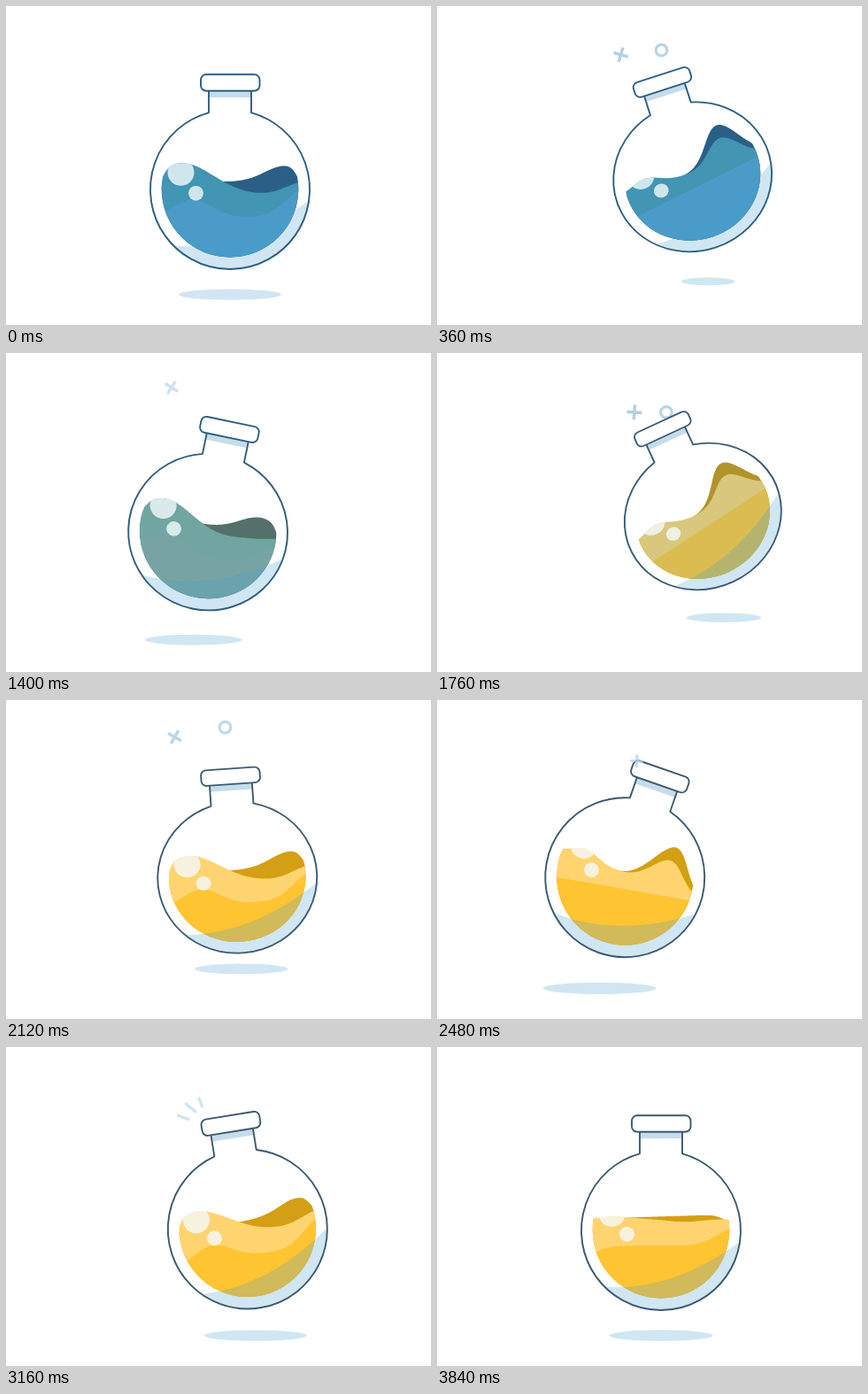
An HTML page that plays this animation: 480 px wide and 360 px high, repeating every 3.88 s.

```html
<!DOCTYPE html>
<html lang="en">
<head>
<meta charset="utf-8">
<title>Swinging flask</title>
<style>
  html, body { margin: 0; width: 100%; height: 100%; overflow: hidden; background: #fff; }
  svg { display: block; width: 480px; height: 360px; }
</style>
</head>
<body>
<svg viewBox="0 0 480 360" fill="none" stroke-linecap="round" stroke-linejoin="round">
  <defs>
    <clipPath id="glass"><circle r="90"/></clipPath>
    <clipPath id="bowl"><circle cy="-1" r="77.3"/></clipPath>
    <clipPath id="wet"><path id="wetPath"/></clipPath>
  </defs>
  <ellipse id="shadow" fill="#d0e6f3"/>
  <g id="rings" stroke="#b8d4e8" stroke-width="3.2"></g>
  <g id="flask">
    <path d="M-24-111V-87A90 90 0 1 0 24-87V-111Z" fill="#fff"/>
    <path d="M-24-112H24V-104H-24Z" fill="#c6dcea"/>
    <g clip-path="url(#bowl)">
      <path id="back"/>
      <path id="mid"/>
      <path id="front"/>
      <g clip-path="url(#wet)" fill="#f4fbfc" fill-opacity=".8">
        <circle cx="-55.5" cy="-19.5" r="15"/>
        <circle cx="-38.5" cy="4" r="8.4"/>
      </g>
    </g>
    <path clip-path="url(#glass)" fill="#439bcb" fill-opacity=".25"
      d="M-70 63C-20 68 35 54 95 8V95H-70Z"/>
    <g id="outline" stroke-width="1.9">
      <path d="M-24-111V-87A90 90 0 1 0 24-87V-111"/>
      <rect x="-33" y="-130" width="66.5" height="18.5" rx="6" fill="#fff"/>
    </g>
  </g>
  <g id="pluses" stroke="#b3d0e5" stroke-width="3.4" stroke-linecap="butt"></g>
  <path id="dashes" stroke="#cfe4f2" stroke-width="3.4" d="M194.500 77.300L206 81.500M203.500 64.500L214 73M218 58L221.500 67"/>
</svg>
<script>
const LOOP = 3880, END = 3840;
const $ = id => document.getElementById(id);
const set = (el, attrs) => { for (const k in attrs) el.setAttribute(k, attrs[k]); };
const clamp = v => Math.max(0, Math.min(1, v));
const mix = (a, b, k) => a + (b - a) * k;
const ease = k => (1 - Math.cos(Math.PI * k)) / 2;

// Turning points of the swing; everything eases from one to the next.
const turns = [0, 580, 1230, 1820, 2435, 3055, 3505, END];
const track = values => t => {
  let i = 0;
  while (i < turns.length - 2 && t >= turns[i + 1]) i++;
  const k = clamp((t - turns[i]) / (turns[i + 1] - turns[i]));
  return mix(values[i], values[i + 1], ease(k));
};
const angle = track([0, 26, -20.8, 26, -19.5, 12.4, -12.4, 0]);
const squash = track([1, .9, 1, .9, 1, 1, 1, 1]);
const shadowW = track([116, 36, 116, 84, 128, 116, 116, 117]);

// A liquid surface is a sloping line with round humps: [height, centre, width].
const surface = (level, slope, ...humps) => x =>
  humps.reduce((y, [h, c, w]) => y - h * Math.exp(-(((x - c) / w) ** 2)), level + slope * x);

const layers = {
  back: {
    calm: surface(-9, 0, [18, 62, 32], [-14, 82, 9]),
    tilted: surface(-4, 0, [47, 44, 28]),
    flat: surface(-16, -.03, [-8, 80, 14]),
    cool: [42, 96, 134], warm: [212, 159, 20]
  },
  mid: {
    calm: surface(6, 0, [36, -54, 50], [15, 85, 30], [-14, -82, 9]),
    tilted: surface(-5, 0, [11, -52, 22], [30, 43, 25]),
    flat: surface(-13, 0, [3, -52, 26], [-3, 26, 26]),
    cool: [66, 149, 179], warm: [255, 212, 112]
  },
  front: {
    calm: surface(31, 0, [20, -42, 30], [32, 85, 30]),
    tilted: surface(13, -.16),
    flat: surface(17, 0, [-10, -85, 20], [20, 85, 30]),
    cool: [75, 154, 200], warm: [254, 196, 50]
  }
};
const line = { cool: [42, 95, 130], warm: [59, 90, 112] };

const tint = ({ cool, warm }, k) =>
  `rgb(${cool.map((v, i) => Math.round(mix(v, warm[i], k)))})`;

function surfacePath({ calm, tilted, flat }, tilt, rest) {
  let d = 'M-80 90';
  for (let x = -80; x <= 80; x += 2) {
    const y = mix(mix(calm(x), tilted(x), tilt), flat(x), rest);
    d += `L${x} ${y.toFixed(2)}`;
  }
  return d + 'V90Z';
}

function add(parent, tag, attrs) {
  const el = document.createElementNS('http://www.w3.org/2000/svg', tag);
  set(el, attrs);
  return $(parent).appendChild(el);
}

// Sparkles rise from the cap, turn and fade.
const sparkles = [75, 885, 1645, 2395, 3230].map((start, i) => ({
  start,
  plus: add('pluses', 'path', { d: 'M-8.500 0H8.500M0-8.500V8.500' }),
  ring: i === 0 || i === 2 ? add('rings', 'circle', { r: 6.3 }) : null
}));

function drawSparkle({ start, plus, ring }, t) {
  const age = t - start;
  const opacity = clamp((age - 30) / 70) * clamp((610 - age) / 150);
  const x = 223 - .09 * (age - 115), y = 75 - .07 * age;
  set(plus, {
    opacity,
    transform: `translate(${x} ${y}) rotate(${.07 * (age - 50)}) scale(${clamp(.4 + age / 190)})`
  });
  if (ring) set(ring, { opacity, cx: 259 - .032 * (age - 115), cy: 78.5 - .1 * age });
}

function draw(now) {
  const t = Math.min(now % LOOP, END);
  const a = angle(t);
  const warm = clamp((t - 1240) / 650);
  const tilt = ease(clamp((Math.abs(a) - 10) / 7));
  const rest = ease(clamp((t - 3000) / (END - 3000)));

  set($('flask'), {
    transform: `translate(253 82.3) rotate(${-a}) scale(1 ${squash(t)}) translate(0 125)`
  });
  for (const name in layers) {
    set($(name), { d: surfacePath(layers[name], tilt, rest), fill: tint(layers[name], warm) });
  }
  set($('wetPath'), { d: $('mid').getAttribute('d') });
  set($('outline'), { stroke: tint(line, warm) });

  // The shadow trails the squash a little.
  const w = shadowW(t);
  set($('shadow'), {
    cx: 253 + a * (3.3 - .018 * a),
    cy: 325.6 - 310 * (1 - squash(t - 80)),
    rx: w / 2,
    ry: 2.6 + w * .031
  });

  sparkles.forEach(s => drawSparkle(s, t));
  set($('dashes'), { opacity: clamp((t - 3060) / 60) * clamp((3260 - t) / 60) });
}

function tick(now) {
  draw(now);
  requestAnimationFrame(tick);
}
draw(0);
requestAnimationFrame(tick);
</script>
</body>
</html>
```
